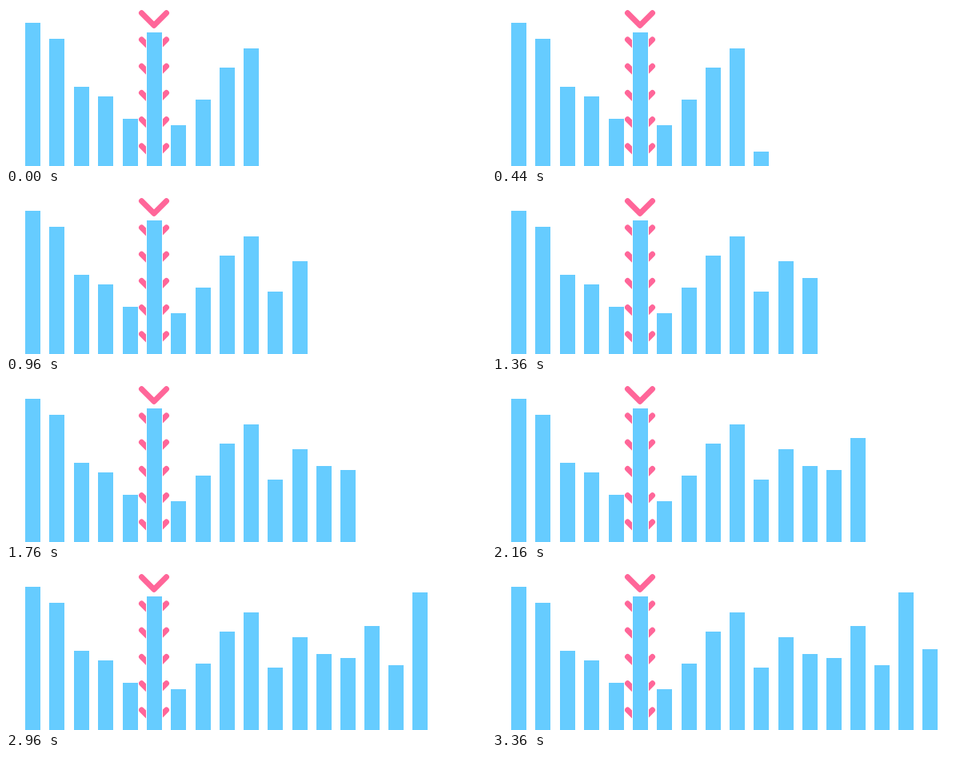
These frames come from a looping animation (600 px wide and 200 px high, 3840 ms). An HTML page with a canvas:

```html
<!DOCTYPE html>
<html>
<head>
<meta charset="utf-8">
<title>Bars</title>
<style>
html, body { margin: 0; width: 100%; height: 100%; overflow: hidden; background: #fff; }
canvas { display: block; }
</style>
</head>
<body>
<canvas width="600" height="200"></canvas>
<script>
const ctx = document.querySelector('canvas').getContext('2d');
const LOOP = 3840, START = 440, EVERY = 400, STEP = 40, FIXED = 10, WIDTH = 19, FLOOR = 200;
const values = [179, 159, 99, 87, 59, 167, 51, 83, 123, 147, 78, 116, 95, 90, 130, 81, 172, 101];

// The spacing narrows slightly towards the right
const left = i => Math.floor(24 + 30.575 * i - 0.018 * i * i);

// Each new bar rises in four steps
function growth(i, t) {
  if (i < FIXED) return 1;
  const step = Math.floor((t - START - (i - FIXED) * EVERY) / STEP);
  return step < 0 ? 0 : 1 - (3 - Math.min(step, 3)) * 0.2567;
}

function drawChevrons() {
  ctx.strokeStyle = '#ff6699';
  ctx.lineWidth = 7;
  ctx.lineCap = ctx.lineJoin = 'round';
  ctx.beginPath();
  for (let k = 0; k < 6; k++) {
    const y = 8.7 + k * 33.25;
    ctx.moveTo(169.5, y);
    ctx.lineTo(185, y + 15.5);
    ctx.lineTo(200.5, y);
  }
  ctx.stroke();
}

function drawBar(x, height) {
  ctx.fillStyle = '#fff';
  ctx.fillRect(x - 1, FLOOR - height - 1, WIDTH + 2, height + 1);
  ctx.fillStyle = '#66ccff';
  ctx.fillRect(x, FLOOR - height, WIDTH, height);
}

function draw() {
  const t = performance.now() % LOOP;
  ctx.fillStyle = '#fff';
  ctx.fillRect(0, 0, 600, 200);
  drawChevrons();
  values.forEach((value, i) => {
    const height = Math.round(value * growth(i, t));
    if (height) drawBar(left(i), height);
  });
  requestAnimationFrame(draw);
}
draw();
</script>
</body>
</html>
```
